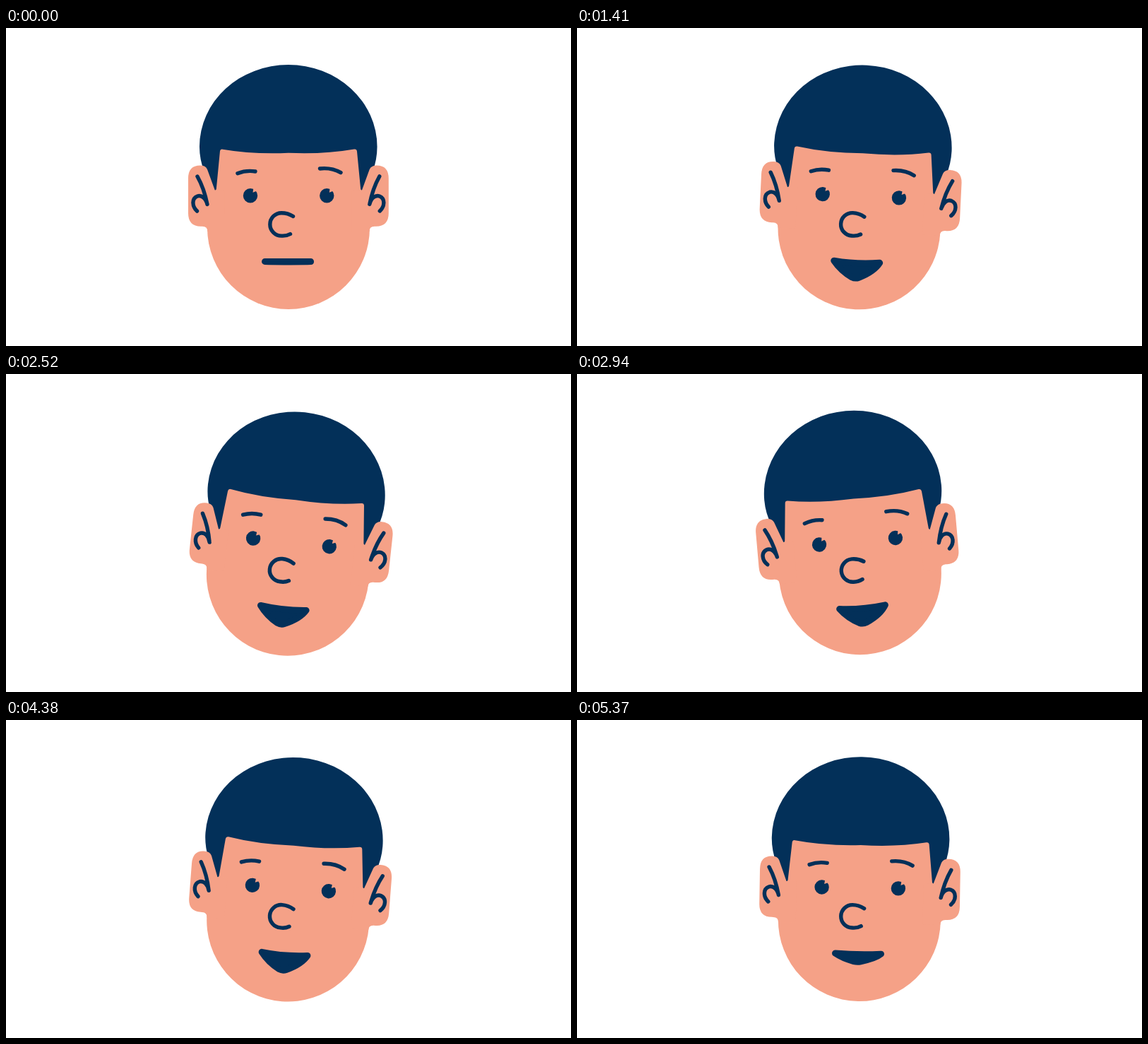
Animation of 800x450 px, one loop 5.4 s. Source, as an HTML page:

```html
<!DOCTYPE html>
<html lang="en">
<head>
<meta charset="utf-8">
<title>Swaying head</title>
<style>
  html, body { margin: 0; width: 100%; height: 100%; overflow: hidden; background: #fff; }
  svg { display: block; width: 100vw; height: 100vh; }
  .skin { fill: #f5a187; }
  .navy { fill: #033059; }
  .line { fill: none; stroke: #033059; stroke-width: 5.4; stroke-linecap: round; stroke-linejoin: round; }
  #mouth { fill: #033059; stroke: #033059; stroke-width: 9; stroke-linecap: round; stroke-linejoin: round; }
</style>
</head>
<body>
<svg viewBox="0 0 800 450">
  <defs>
    <g id="ear">
      <path class="skin" d="M258 213Q258 194.5 275 194.5Q282.500 194.500 285 200L295.800 229.500L310 229V288H285.300Q285.300 280.800 278 280.800H276Q258 280.800 258 262Z"/>
      <path class="line" d="M271 210Q280.500 227 285 249.500C283 241 277 236 271 238C263 241 263 252 270.500 259"/>
    </g>
    <g id="eye">
      <circle class="navy" cx="346" cy="237.300" r="10.200"/>
      <path class="skin" d="M349.500 232.800L350.500 226L356 230.300Z"/>
    </g>
  </defs>
  <g id="head">
    <path class="skin" d="M285 165H515V283A115 115 0 0 1 285 283Z"/>
    <path class="navy" d="M274 168A125.800 116 0 0 1 525.600 168Q525.600 186 519 204L506 228Q504 232 502.200 228L497 174.500Q496.500 171 493 171.600Q450 179 400 176.800Q350 179 307 171.600Q303.500 171 303 174.500L297.800 228Q296 232 294 228L281 204Q274 186 274 168Z"/>
    <use href="#ear"/>
    <use href="#ear" transform="matrix(-1 0 0 1 799.800 0)"/>
    <use href="#eye"/>
    <use href="#eye" x="108.300"/>
    <path class="line" d="M328 205.700Q340 201 353 203M444.500 199Q461 197.200 474 204.700"/>
    <path class="line" d="M406.500 266.500Q399 261.700 390 261.700A16.200 16.200 0 0 0 390 294.100Q397 294.600 402.500 291.500"/>
    <path id="mouth"/>
  </g>
</svg>
<script>
const LOOP = 5400, SWING = 450, HALF = SWING / 2, LEFT = -5.5, RIGHT = 7.5;
const head = document.getElementById('head');
const mouth = document.getElementById('mouth');

// Starts and ends upright, with an even back-and-forth sway between.
function tilt(t) {
  if (t < HALF) return LEFT * t / HALF;
  if (t > LOOP - HALF) return RIGHT * (LOOP - t) / HALF;
  const u = (t - HALF) / SWING % 2;
  return LEFT + (RIGHT - LEFT) * (u < 1 ? u : 2 - u);
}

// The mouth shuts only around the loop point.
function openness(t) {
  const u = Math.min(1, t / 100, (LOOP - t) / 100);
  return u * (2 - u);
}

function mouthPath(open) {
  const y = k => 330.5 + k * open;
  return `M366.5 ${y(0)}Q398 ${y(4)} 431.5 ${y(0)}` +
    `Q424 ${y(13)} 403 ${y(22.3)}Q398 ${y(24.5)} 393 ${y(22.3)}Q377 ${y(14)} 366.5 ${y(0)}Z`;
}

function draw(now) {
  const t = now % LOOP;
  head.setAttribute('transform', `rotate(${tilt(t)} 392 273)`);
  mouth.setAttribute('d', mouthPath(openness(t)));
}

const start = performance.now();
function tick() {
  draw(performance.now() - start);
  requestAnimationFrame(tick);
}
tick();
</script>
</body>
</html>
```
